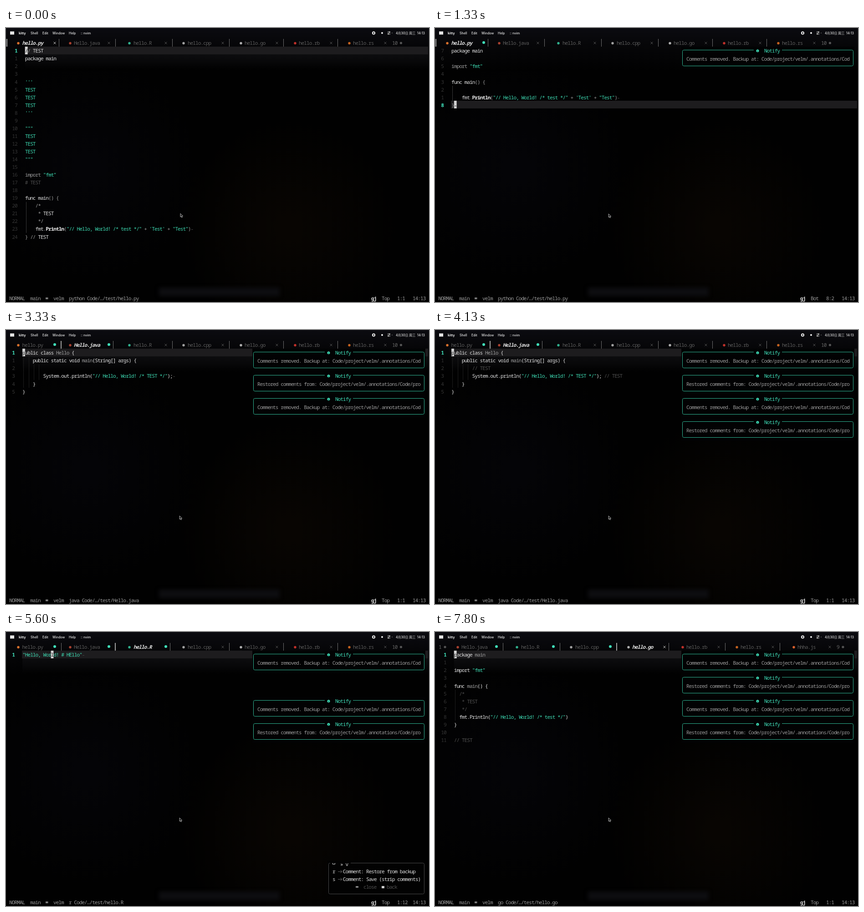
Recreate the animation shown at these times as an HTML page with a canvas. Size 929x603 px, loop 8 s.

```html
<!DOCTYPE html>
<html lang="en">
<head>
<meta charset="utf-8">
<title>Comment stripping in an editor</title>
<style>
  html, body { margin: 0; width: 100%; height: 100%; overflow: hidden; background: #000; }
  canvas { display: block; }
</style>
</head>
<body>
<canvas id="stage" width="929" height="603"></canvas>
<script>
const ctx = document.getElementById('stage').getContext('2d');
const LOOP = 8000, CELL = 5.683, ROW = 17.05, TOP = 50.3;
const GREEN = '#40e0ba';
const MONO = '"Noto Sans Mono", "DejaVu Sans Mono", monospace';
const SANS = 'Inter, "Noto Sans CJK SC", "Noto Sans CJK", sans-serif';

// Each part of a line starts with its style: white, grey, dim, string, bold.
const INK = { w: '#e2e2e2', g: '#9c9c9c', d: '#505050', s: '#3edcb4', b: '#f4f4f4' };
const parse = text => text.split('\n').map(line =>
  line ? line.split('|').map(p => [p[0], p.slice(1)]) : []);
const plain = line => line.map(p => p[1]).join('');

const printPy = `w    fmt|g.|bPrintln|g(|s"// Hello, World! /* test */"|g + |s'Test'|g + |s"Test"|g)|d-`;
const printJava = 'w        System.out.println(|s"// Hello, World! /* TEST */"|w);';
const printCpp = 'w    std::cout << |s"// Hello, World! /* test */"|w << std::endl;';
const headJava = 'wpublic class |gHello |w{\nw    public static void |gmain|w(String[] args) {';
const headCpp = 's#include <iostream>\n\nwint |gmain|w() {';
const tailCpp = 'b    return |s0|w;\nw}';

const files = {
  py: {
    name: 'hello.py', type: 'python', guide: 4,
    full: parse(`g// |wTEST\nwpackage main\n\n
s'''\nsTEST\nsTEST\nsTEST\ns'''\n
s"""\nsTEST\nsTEST\nsTEST\ns"""\n
gimport |s"fmt"\nd# TEST\n
wfunc main|g() {\ng    /*\ng     * |wTEST\ng     */\n${printPy}\ng} // |wTEST`),
    bare: parse(`wpackage main\n\ngimport |s"fmt"\n\nwfunc main|g() {\n\n${printPy}\ng}|d-`)
  },
  java: {
    name: 'Hello.java', type: 'java', guide: 2,
    full: parse(`${headJava}\nd        // TEST\n${printJava}|d // TEST\nw    }\nw}`),
    bare: parse(`${headJava}\n\n${printJava}|d-\nw    }\nw}`)
  },
  r: {
    name: 'hello.R', type: 'r', guide: 4,
    full: parse('d# TEST\ns"Hello, World! # HEllo"|d  # TEST'),
    bare: parse('s"Hello, World! # HEllo"|d-')
  },
  cpp: {
    name: 'hello.cpp', type: 'cpp', guide: 4,
    full: parse(`${headCpp}\nd    /*\nd     * TEST\nd     */\n${printCpp}|d // TEST\n${tailCpp}`),
    bare: parse(`${headCpp}\n\n${printCpp}|d-\n${tailCpp}`)
  },
  go: {
    name: 'hello.go', type: 'go', guide: 2,
    full: parse(`wpackage |gmain\n\nwimport |s"fmt"\n\nwfunc |gmain|w() {
d  /*\nd   * TEST\nd   */\nw  fmt.Println(|s"// Hello, World! /* test */"|w)\nw}\n\nd// TEST`)
  }
};

// time, file, version, cursor row, cursor column
const states = [
  [0, 'py', 'full', 0, 0], [200, 'py', 'full', 24, 8], [1070, 'py', 'bare', 7, 1],
  [1900, 'py', 'full', 7, 1], [2600, 'java', 'full', 0, 0], [3070, 'java', 'bare', 0, 0],
  [3930, 'java', 'full', 0, 0], [4470, 'r', 'full', 1, 11], [5070, 'r', 'bare', 0, 11],
  [5670, 'r', 'full', 0, 11], [5930, 'cpp', 'full', 0, 0], [6200, 'cpp', 'bare', 0, 0],
  [7000, 'cpp', 'full', 0, 0], [7670, 'go', 'full', 0, 0]
];
const menus = [[800, 1070], [1670, 1900], [2800, 3070], [3730, 3930],
  [4870, 5070], [5470, 5670], [6070, 6200], [6870, 7000]];
// slot, message, start, end
const notices = [
  [0, 0, 1140, 4600], [1, 1, 1970, 5200], [2, 0, 3140, 6130], [3, 1, 4000, 7070],
  [0, 0, 5130, LOOP], [1, 1, 5740, LOOP], [2, 0, 6330, LOOP], [3, 1, 7140, LOOP]
];
const messages = [
  'Comments removed. Backup at: Code/project/velm/.annotations/Cod',
  'Restored comments from: Code/project/velm/.annotations/Code/pro'
];
// file, label, icon colour, icon x, name x, close x, right edge, time of first edit
const tabs = [
  ['py', 'hello.py', '#d9702c', 27, 35.6, 107, 121, 1070],
  ['java', 'Hello.java', '#a8402f', 141, 149, 226, 240, 3070],
  ['r', 'hello.R', '#2fae8c', 271, 280, 351, 365, 5070],
  ['cpp', 'hello.cpp', '#a0a0a0', 390, 399, 476, 490, 6200],
  ['go', 'hello.go', '#b0b0b0', 516, 524, 595, 609, LOOP],
  ['rb', 'hello.rb', '#c0302a', 635, 643, 714, 728, LOOP],
  ['rs', 'hello.rs', '#c4621f', 754, 762, 833, 848, LOOP],
  ['js', 'hhha.js', '#d9602c', 879, 887, 958, 972, LOOP]
];

function rect(x, y, w, h, color) {
  ctx.fillStyle = color;
  ctx.fillRect(x, y, w, h);
}

function dot(x, y, r, color) {
  ctx.fillStyle = color;
  ctx.beginPath();
  ctx.arc(x, y, r, 0, 7);
  ctx.fill();
}

function path(points, color, width = 1) {
  ctx.strokeStyle = color;
  ctx.lineWidth = width;
  ctx.beginPath();
  points.forEach(p => ctx.lineTo(...p));
  ctx.stroke();
}

function type(text, x, y, color, style = '') {
  ctx.font = `${style} 11.2px ${MONO}`;
  ctx.fontStretch = 'extra-condensed';
  ctx.letterSpacing = '0px';
  ctx.letterSpacing = (CELL - ctx.measureText('0').width) + 'px';
  ctx.fillStyle = color;
  ctx.fillText(text, x, y + 4);
}

function label(text, x, style = '500', align = 'left') {
  ctx.font = `${style} 7px ${SANS}`;
  ctx.fontStretch = 'normal';
  ctx.letterSpacing = '0px';
  ctx.textAlign = align;
  ctx.fillStyle = '#ececec';
  ctx.fillText(text, x, 13.5);
  ctx.textAlign = 'left';
}

function cross(x, y, color) {
  path([[x - 2.5, y - 2.5], [x + 2.5, y + 2.5]], color);
  path([[x - 2.5, y + 2.5], [x + 2.5, y - 2.5]], color);
}

// Rounded frame whose top edge is open between two x positions.
function frame(x, y, w, h, gapStart, gapEnd, color) {
  ctx.strokeStyle = color;
  ctx.lineWidth = 1;
  ctx.beginPath();
  ctx.moveTo(gapEnd, y);
  ctx.arcTo(x + w, y, x + w, y + h, 3);
  ctx.arcTo(x + w, y + h, x, y + h, 3);
  ctx.arcTo(x, y + h, x, y, 3);
  ctx.arcTo(x, y, x + w, y, 3);
  ctx.lineTo(gapStart, y);
  ctx.stroke();
}

function glow(x, y, r, color) {
  const fill = ctx.createRadialGradient(x, y, 20, x, y, r);
  fill.addColorStop(0, color);
  fill.addColorStop(1, color + '00');
  rect(x - r, y - r, 2 * r, 2 * r, fill);
}

function backdrop() {
  rect(0, 0, 929, 603, '#010101');
  glow(180, 310, 250, '#040407');
  glow(620, 440, 240, '#080502');
  const top = ctx.createLinearGradient(0, 0, 0, 95);
  top.addColorStop(0, '#0b0b10');
  top.addColorStop(.4, '#060608');
  top.addColorStop(1, '#010101');
  rect(0, 0, 929, 95, top);
  ctx.save();
  ctx.filter = 'blur(4px)';
  rect(336, 571, 265, 19, '#0d0d10');
  ctx.restore();
}

function menuBar() {
  rect(9, 7.5, 9, 7, '#e6e6e6');
  label('kitty', 28, 'bold');
  [['Shell', 54], ['Edit', 80], ['Window', 102], ['Help', 138], [':: nvim', 164]]
    .forEach(m => label(...m));
  ctx.strokeStyle = '#f0f0f0';
  ctx.lineWidth = 2;
  ctx.beginPath();
  ctx.arc(807.5, 11, 2.6, 0, 7);
  ctx.stroke();
  dot(826, 11, 2, '#f0f0f0');
  for (const [y, knob] of [[9, 839.5], [13, 842.5]]) {
    path([[838, y], [844, y]], '#c8c8c8', 2.4);
    dot(knob, y, .9, '#111');
  }
  dot(848, 11, .8, '#999');
  label('4月30日 周三', 856);
  label('14:13', 920, '500', 'right');
}

function tabBar(t, open) {
  const scrolled = open === 'go', dx = scrolled ? -91 : 0, y = 33;
  const visible = scrolled ? tabs.slice(1) : tabs.slice(0, -1);
  let left = 2;
  if (scrolled) {
    type('1', 8, y, '#666');
    dot(22, y, 2.6, '#555');
  }
  visible.forEach(([id, name, color, icon, x, close, edge, edited], i) => {
    const on = id === open, next = visible[i + 1];
    dot(icon + dx, y + .5, 2.7, color);
    type(name, x + dx, y, on ? '#dcdcdc' : '#5c5c5c', on ? 'italic 600' : '');
    if (t >= edited) dot(close + dx, y - 1, 3, GREEN);
    else cross(close + dx, y, on ? '#c8c8c8' : '#555');
    if (on) path([[left + dx, 24], [left + dx, 41]], '#a0a0a0', 2);
    if (next && next[0] !== open) {
      const bar = edge + dx - (on ? 5 : 0) + .5;
      path([[bar, 24], [bar, 41]], '#707070');
    }
    left = edge;
  });
  type(scrolled ? '9' : '10', scrolled ? 882 : 848, y, '#666');
  dot(scrolled ? 896 : 867.5, y, 2.6, '#555');
}

const textLeft = lines => lines.length > 9 ? 41.8 : 36.1;
const indentOf = line => plain(line).search(/\S|$/);

function code(lines, row, guide) {
  const x0 = textLeft(lines);
  rect(x0 - 1, Math.round(TOP + row * ROW - 9.5), 928 - x0, 17, '#1d1c1e');
  if (row === 0) {
    const fade = ctx.createLinearGradient(0, 58, 0, 90);
    fade.addColorStop(0, '#0c0c0e');
    fade.addColorStop(1, '#0c0c0e00');
    rect(x0, 58, 927 - x0, 32, fade);
  }
  lines.forEach((line, i) => {
    const y = TOP + i * ROW, here = i === row;
    const num = String(here ? i + 1 : Math.abs(i - row));
    type(num, x0 - 17.2 - num.length * CELL, y, here ? GREEN : '#363636', here ? 'bold' : '');
    const solid = line.length ? line : lines[i + 1] || [];
    for (let c = 0; c + guide <= indentOf(solid); c += guide) {
      const x = Math.floor(x0 + c * CELL + 2.8) + .5;
      path([[x, y - 8.5], [x, y + 8.5]], guide === 2 ? '#1d1d1d' : '#383838');
    }
    let col = 0;
    for (const [style, text] of line) {
      type(text, x0 + col * CELL, y, INK[style], style === 'b' ? 'bold' : '');
      col += text.length;
    }
  });
}

function spot([, id, version, row, col]) {
  return [textLeft(files[id][version]) + col * CELL, Math.round(TOP + row * ROW - 9.5)];
}

// The tail lags behind the head, which leaves a short smear while moving.
function caret(state, before, lines, t) {
  const to = spot(state), from = before ? spot(before) : to;
  const at = ms => {
    const k = 1 - (1 - Math.min(1, (t - state[0]) / ms)) ** 3;
    return [0, 1].map(i => from[i] + (to[i] - from[i]) * k);
  };
  const head = at(140), tail = at(260);
  rect(...head, 5.8, 17, '#d2d2d2');
  if (Math.hypot(head[0] - tail[0], head[1] - tail[1]) > 1) {
    path([[head[0] + 2.9, head[1] + 8], [tail[0] + 2.9, tail[1] + 8]], '#d2d2d2', 5);
  }
  const glyph = plain(lines[state[3]])[state[4]] || ' ';
  type(glyph, to[0], TOP + state[3] * ROW, '#222');
}

function status(file, lines, row, col) {
  const y = 595, grey = '#9a9a9a';
  type('NORMAL', 7.2, y, grey);
  type('main', 53, y, grey);
  rect(87, 593, 5.5, 4, '#777');
  type('velm', 104, y, grey);
  type(`${file.type} Code/…/test/${file.name}`, 138, y, grey);
  type('gj', 802, y, '#e0e0e0', 'bold');
  const place = row === 0 ? 'Top' : row === lines.length - 1 ? 'Bot'
    : Math.round((row + 1) / lines.length * 100) + '%';
  type(place, 825, y, grey);
  type(`${row + 1}:${col + 1}`, 859, y, grey);
  type('14:13', 893, y, grey);
}

function notice(slot, message) {
  const y = 48.5 + slot * 51;
  rect(541, y - 7.5, 380, 50, '#020203');
  frame(543.5, y, 375, 35, 700, 762, '#2fb794');
  dot(708.5, y + 1.8, 3, GREEN);
  rect(708, y + .8, 1, 3, '#06251d');
  type('Notify', 723, y + 1.9, GREEN);
  type(messages[message], 552, y + 19.1, '#9c9c9c');
}

function keyMenu() {
  rect(706, 503, 215, 78, '#020202');
  frame(708.5, 508.5, 210, 68, 712, 757, '#484848');
  path([[717.5, 508.5], [717.5, 511], [722.5, 511], [722.5, 508.5]], '#ddd');
  type('»', 734, 510.5, '#ddd');
  type('v', 745.5, 510.5, '#ddd');
  [['r', 'Comment: Restore from backup'], ['s', 'Comment: Save (strip comments)']]
    .forEach(([key, text], i) => {
      const y = 527.3 + i * ROW;
      type(key, 717, y, '#d6d6d6');
      path([[729, y], [737.5, y]], '#666');
      path([[734.5, y - 3], [738, y], [734.5, y + 3]], '#666');
      type(text, 739.8, y, '#e2e2e2');
    });
  rect(768, 559.5, 6, 3, '#999');
  type('close', 785, 561.4, '#505050');
  rect(825, 559, 6, 5, '#ccc');
  type('back', 836, 561.4, '#505050');
}

function mouse(t) {
  const k = Math.min(1, Math.max(0, (t - 70) / 400));
  ctx.save();
  ctx.translate(383 - 1.8 * k, 408.3 + .7 * k);
  ctx.beginPath();
  [[0, 0], [0, 7.5], [1.8, 6], [3, 8.8], [4.2, 8.2], [3.2, 5.6], [5.4, 5.4]]
    .forEach(p => ctx.lineTo(...p));
  ctx.closePath();
  ctx.fillStyle = '#111';
  ctx.fill();
  ctx.strokeStyle = '#c4c4c4';
  ctx.lineWidth = .9;
  ctx.stroke();
  ctx.restore();
}

function draw(now) {
  const t = now % LOOP;
  const index = states.findLastIndex(s => s[0] <= t);
  const state = states[index], [, id, version, row, col] = state;
  const file = files[id], lines = file[version];
  backdrop();
  menuBar();
  tabBar(t, id);
  code(lines, row, file.guide);
  caret(state, states[index - 1], lines, t);
  notices.forEach(([slot, message, on, off]) => {
    if (t >= on && t < off) notice(slot, message);
  });
  if (menus.some(([on, off]) => t >= on && t < off)) keyMenu();
  status(file, lines, row, col);
  mouse(t);
  requestAnimationFrame(draw);
}
requestAnimationFrame(draw);
</script>
</body>
</html>
```
